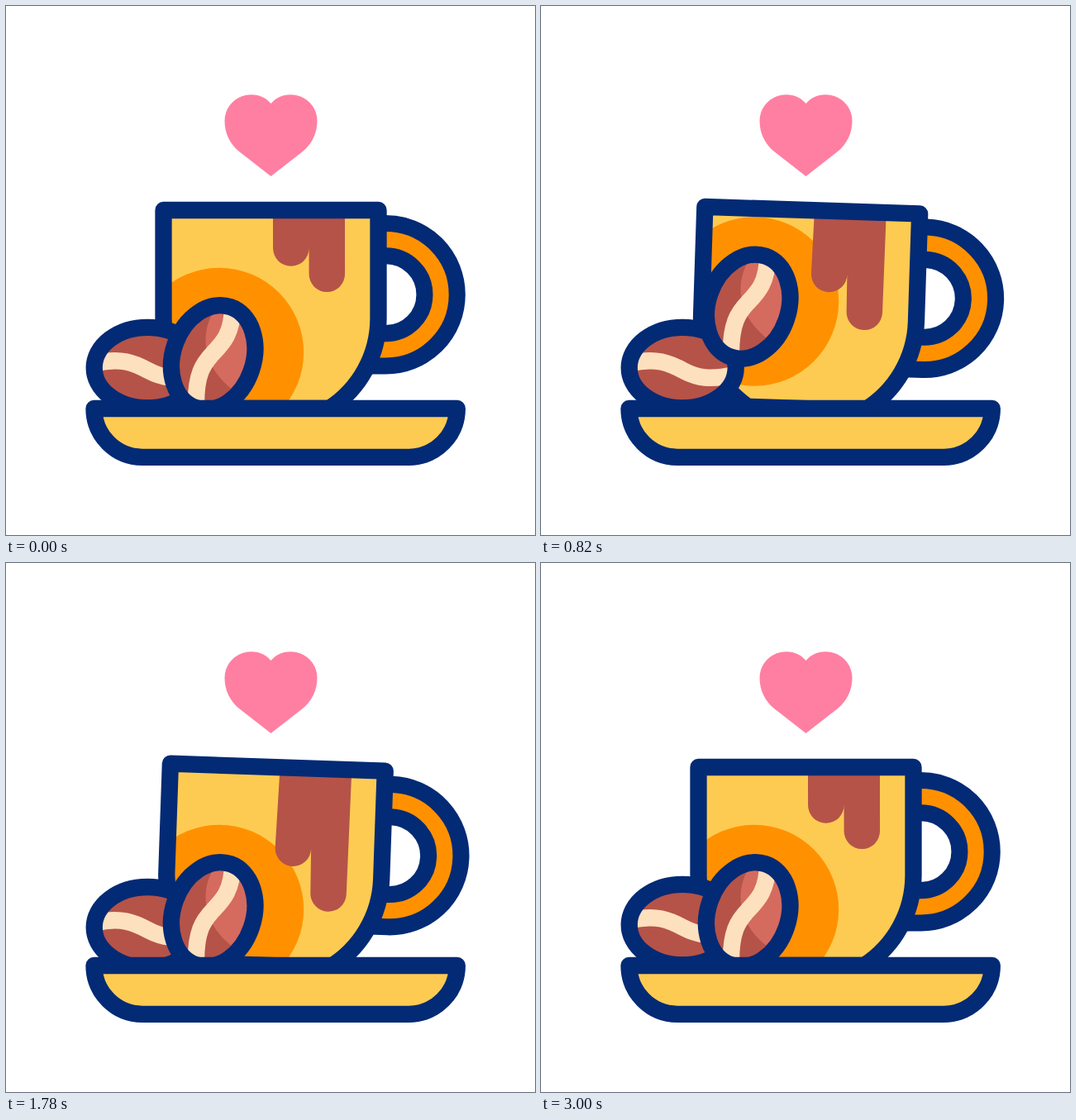
These frames come from a looping animation (640x640 px, 3.02 s). An HTML page:

```html
<!DOCTYPE html>
<html lang="en">
<head>
<meta charset="utf-8">
<title>Coffee cup</title>
<style>
  html, body { margin: 0; width: 100%; height: 100%; overflow: hidden; background: #fff; }
  svg { display: block; width: 100vw; height: 100vh; }
  .line { fill: none; stroke: #032a75; stroke-width: 20.3; stroke-linejoin: round; }
  .yellow { fill: #fecb52; }
  .brown { fill: #b55348; }
  .cream { fill: none; stroke: #fde0bd; stroke-width: 20.5; }
</style>
</head>
<body>
<svg viewBox="0 0 640 640">
  <defs>
    <path id="cup" d="M190.5 247H450.5V378A130 130 0 0 1 391 487H250A130 130 0 0 1 190.5 378Z"/>
    <path id="grip" d="M430 282.6H459.5A66.6 66.6 0 0 1 459.5 415.8H430" fill="none"/>
    <ellipse id="bean" rx="64.5" ry="48.8"/>
    <clipPath id="inCup"><use id="cupClip" href="#cup"/></clipPath>
    <clipPath id="inBack"><use href="#bean" transform="translate(171.2 437.7)"/></clipPath>
    <clipPath id="inFront"><use href="#bean" transform="translate(250.7 425.2) rotate(-71)"/></clipPath>
  </defs>

  <path id="heart" fill="#ff7fa2" d="M320.5 118A32 32 0 0 0 264.5 139C264.5 154 271 167 282 176L320.5 206L359 176C370 167 376.5 154 376.5 139A32 32 0 0 0 320.5 118Z"/>

  <g class="tilt">
    <use href="#grip" stroke="#032a75" stroke-width="59.4"/>
    <use href="#grip" stroke="#ff9100" stroke-width="19.2"/>
    <use href="#cup" class="yellow"/>
  </g>
  <g clip-path="url(#inCup)">
    <circle id="disc" cx="258" cy="419" r="102.2" fill="#ff9100"/>
    <g class="tilt"><path id="drip" class="brown"/></g>
  </g>
  <g class="tilt"><use href="#cup" class="line"/></g>

  <g id="back">
    <g clip-path="url(#inBack)">
      <path class="brown" d="M90 370H250V500H90Z"/>
      <path class="cream" d="M108 432C140 425 155 432 172 441S205 453 234 446"/>
    </g>
    <use href="#bean" class="line" transform="translate(171.2 437.7)"/>
  </g>
  <g id="front">
    <g clip-path="url(#inFront)">
      <path class="brown" d="M180 350H320V500H180Z"/>
      <path fill="#d46b5e" d="M252 368C235 395 236 436 275 465L310 450V360Z"/>
      <path class="cream" d="M274 364C274 396 262 408 250.5 420S229 445 230 486"/>
    </g>
    <use href="#bean" class="line" transform="translate(250.7 425.2) rotate(-71)"/>
  </g>

  <g>
    <path id="saucer" class="yellow" d="M106.5 487H545.8A58.7 58.7 0 0 1 487.5 545.8H165A58.7 58.7 0 0 1 106.5 487Z"/>
    <use href="#saucer" class="line"/>
  </g>
</svg>
<script>
const LOOP = 3020, start = performance.now();
const $ = id => document.getElementById(id);
const tilted = [...document.querySelectorAll('.tilt'), $('cupClip')];

// Eased value at time t through [time, value] keys
function tween(t, keys) {
  if (t <= keys[0][0]) return keys[0][1];
  for (let i = 1; i < keys.length; i++) {
    const [a, from] = keys[i - 1], [b, to] = keys[i];
    if (t < b) {
      const p = (t - a) / (b - a);
      return from + (to - from) * p * p * (3 - 2 * p);
    }
  }
  return keys[keys.length - 1][1];
}

// Springy step from 0 to 1
const spring = t => tween(t, [[0, 0], [190, 1.06], [300, .99], [400, 1.005], [600, 1]]);
const hop = t => -58.8 * (spring(t) - spring(t - 600));

function dripPath(k) {
  const r = 21.75, x1 = 344.8 - 2.7 * k, y1 = 293 + 59 * k;
  const x2 = 388.3 - 1.5 * k, y2 = 324.3 + 84.3 * k;
  const tip = (x, y) => `L${x - r} ${y}A${r} ${r} 0 0 0 ${x + r} ${y}`;
  return `M323 245V257${tip(x1, y1)}${tip(x2, y2)}L410 257V245Z`;
}

function draw() {
  const t = (performance.now() - start) % LOOP;

  const beat = tween(t % 1000, [[200, 1], [500, 1.177], [700, 1]]);
  $('heart').setAttribute('transform', `translate(320.5 160.5) scale(${beat}) translate(-320.5 -160.5)`);

  const angle = tween(t, [[0, 0], [600, 4], [1200, -3], [1800, 2], [2400, -1], [3000, 0]]);
  for (const el of tilted) el.setAttribute('transform', `rotate(${angle} 320 487)`);

  $('drip').setAttribute('d', dripPath(tween(t, [[0, 0], [1600, 1], [2400, 0]])));

  const lift = `translate(0 ${hop(t - 600)})`;
  $('front').setAttribute('transform', lift);
  $('disc').setAttribute('transform', lift);
  $('back').setAttribute('transform', `translate(0 ${hop(t - 1000)})`);

  requestAnimationFrame(draw);
}
draw();
</script>
</body>
</html>
```
